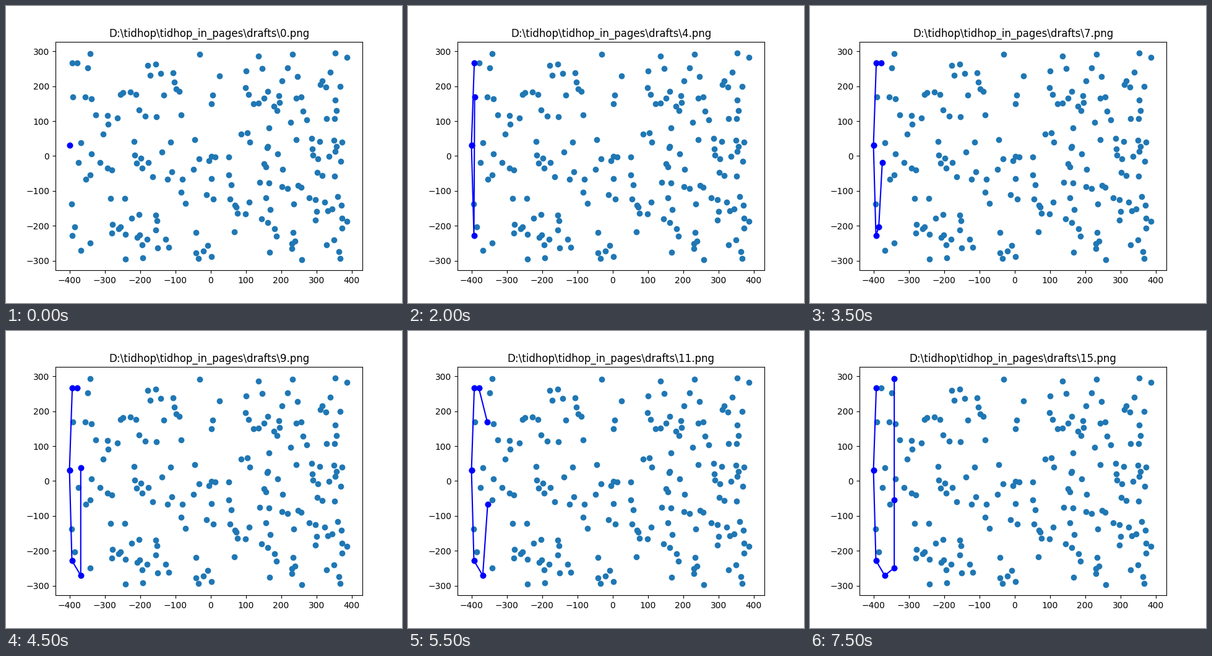
A matplotlib script for the animation above (8000 ms loop, 640 by 480 pixels).

```python
import numpy as np
import matplotlib.pyplot as plt
from matplotlib.animation import FuncAnimation

STEP_MS = 500
TOTAL = 200
X_MIN, X_MAX, Y_MAX = -400, 391, 298
MARGIN = 0.05
TITLE = r"D:\tidhop\tidhop_in_pages\drafts\{}.png"

# Points the sweep visits, from left to right
SWEEP = [
    (X_MIN, 31), (-394, -138), (-393, -228), (-392, 266),
    (-391, 169), (-385, -204), (-379, 266), (-375, -19),
    (-368, -271), (-368, 38), (-355, 169), (-354, -67),
    (-348, 253), (-341, -249), (-341, -54), (-341, 293),
]


def random_cloud(n, seed=12):
    """Uniform points to the right of the sweep."""
    rng = np.random.default_rng(seed)
    x = rng.integers(SWEEP[-1][0] + 2, X_MAX, n, endpoint=True)
    y = rng.integers(-Y_MAX, Y_MAX, n, endpoint=True)
    return np.column_stack([x, y])


def cross(a, b, c):
    return (b[0] - a[0]) * (c[1] - a[1]) - (b[1] - a[1]) * (c[0] - a[0])


def trim(chain, p, side):
    while len(chain) > 1 and side * cross(chain[-2], chain[-1], p) < 0:
        chain.pop()


def half_hull(pts, side):
    chain = []
    for p in pts:
        trim(chain, p, side)
        chain.append(p)
    return chain


def chains(i):
    """Lower chain with point i added; upper chain only trimmed for it."""
    lower = half_hull(SWEEP[:i + 1], 1)
    upper = half_hull(SWEEP[:i], -1)
    trim(upper, SWEEP[i], -1)
    return lower, upper


cloud = np.vstack([SWEEP, random_cloud(TOTAL - len(SWEEP))])
pad_x = MARGIN * (X_MAX - X_MIN)
pad_y = MARGIN * 2 * Y_MAX

fig, ax = plt.subplots(figsize=(6.4, 4.8), dpi=100)
ax.scatter(*cloud.T)
ax.set_xlim(X_MIN - pad_x, X_MAX + pad_x)
ax.set_ylim(-Y_MAX - pad_y, Y_MAX + pad_y)
title = ax.set_title("")
lines = [ax.plot([], [], "bo-")[0] for _ in range(2)]


def update(i):
    title.set_text(TITLE.format(i))
    for line, chain in zip(lines, chains(i)):
        line.set_data([p[0] for p in chain], [p[1] for p in chain])
    return [title, *lines]


anim = FuncAnimation(fig, update, frames=len(SWEEP), interval=STEP_MS,
                     repeat=True, repeat_delay=0, blit=False)
plt.show()
```
